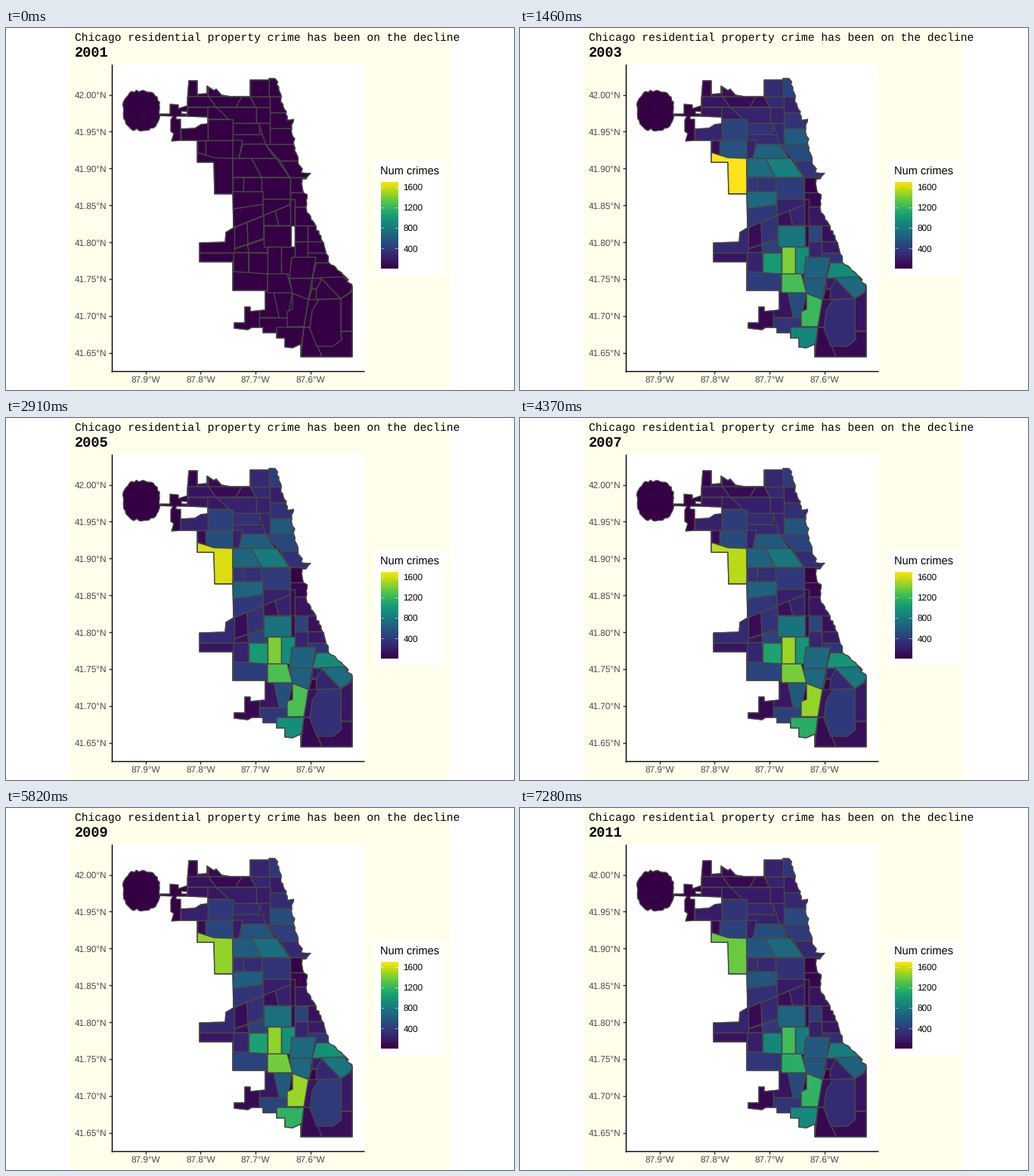
Animation of 672 by 480 pixels, one loop 8000 ms. Source, as a matplotlib script:

```python
import numpy as np
import matplotlib.pyplot as plt
from matplotlib.animation import FuncAnimation
from matplotlib.collections import PolyCollection
from matplotlib.colors import ListedColormap
from matplotlib.patches import Polygon, Rectangle

W, H = 672, 480
STEP, LOOP = 40, 8000
FIRST, YEARS = 2001, 11
TOP = 1690
CREAM, GREY, EDGE = "#ffffec", "#484848", "#474747"
SANS, MONO = "Liberation Sans", "Liberation Mono"

plt.rcParams["text.hinting"] = "none"
rng = np.random.default_rng(4)
shapes, levels = [], []


def area(points, level):
    shapes.append(np.array(points, float))
    levels.append(level)


def band(top, bottom, cuts, *values):
    """Row of areas between two streets; a pair gives a slanted street or cut."""
    (tl, tr), (bl, br) = (np.broadcast_to(y, 2) for y in (top, bottom))
    xs = [np.broadcast_to(c, 2) for c in cuts]
    tops, bottoms = np.array(xs).T
    ty = np.interp(tops, [tops[0], tops[-1]], [tl, tr])
    by = np.interp(bottoms, [bottoms[0], bottoms[-1]], [bl, br])
    for i, v in enumerate(values):
        area([(tops[i], ty[i]), (tops[i + 1], ty[i + 1]),
              (bottoms[i + 1], by[i + 1]), (bottoms[i], by[i])], v)


def rough(points, gap=3.5, size=0.9):
    """Break straight runs into small random steps."""
    out = []
    for p, q in zip(points, points[1:]):
        n = max(1, int(np.hypot(q[0] - p[0], q[1] - p[1]) / gap))
        for t in np.arange(n) / n:
            out.append(np.add(p, np.subtract(q, p) * t) + rng.normal(0.3, size, 2))
    return out + [points[-1]]


def count(level, y, year):
    """Peak in 2003, slow decline, with a later second wave in the south."""
    if year == FIRST:
        return 3
    trend = 0.8 if year == 2002 else 1 - 0.026 * (year - 2003)
    south = max(0, (y - 150) / 250) ** 2
    wave = 0.5 * np.exp(-((year - 2008.4) / 3) ** 2)
    return level * (trend + south * wave)


# City limits
coast = [(356, 67), (361, 78), (367, 105), (372, 122), (380, 120), (377, 133),
         (381, 154), (386, 176), (391, 190), (404, 194), (392, 199), (392, 218),
         (398, 220), (396, 237), (405, 256), (418, 282), (424, 298), (427, 311),
         (446, 327), (458, 343)]
inland = [(458, 436), (390, 436), (390, 419), (379, 424), (369, 423), (369, 411),
          (358, 411), (358, 404), (340, 404), (340, 397), (325, 397), (320, 400),
          (302, 398), (302, 391), (316, 391), (316, 370), (323, 370), (323, 376),
          (343, 374), (343, 348), (300, 348), (300, 310), (256, 310), (256, 285),
          (290, 284), (291, 271), (301, 265), (300, 220), (276, 220), (275, 178),
          (253, 178), (253, 149), (231, 149), (231, 134), (250, 133), (258, 128),
          (267, 127), (267, 118), (240, 117), (240, 95), (242, 70), (253, 70),
          (253, 88), (266, 87), (266, 77), (275, 83), (278, 81), (285, 89),
          (297, 91), (323, 91), (323, 69), (348, 69), (348, 67)]
limits = rough(coast) + inland

# Airport: a rounded block, a narrow link and the land beside it
turn = np.linspace(0, 2 * np.pi, 48, endpoint=False)
c, s = np.cos(turn), np.sin(turn)
reach = (np.abs(c) ** 2.5 + np.abs(s) ** 2.5) ** -0.4 + rng.normal(0, 0.03, 48)
airport = np.c_[179 + 24 * reach * c, 109.5 + 26.5 * reach * s]
link = [(202, 114), (217, 114), (217, 101), (228, 102), (228, 107), (240, 103),
        (240, 111), (232, 110), (232, 114), (240, 114), (240, 117), (225, 117),
        (225, 121), (231, 121), (231, 149), (219, 150), (222, 140), (218, 137),
        (218, 122), (221, 117), (202, 116)]

# North
band(66, 91, [240, 253, 267, 323, 348, 366], 50, 150, 90, 290, 430)
band(91, 105, [240, (268, 278), (312, 304), (323, 330), 349], 150, 90, 110, 290)
band(91, 112, [349, 375], 220)
band(112, 133, [349, 385], 340)
band(133, 154, [349, 385], 600)
band(105, 121, [230, 267, (278, 300)], 150, 180)
band(105, 126, [(278, 300), 331, 349], 240, 230)
band(121, 149, [231, 267, 300], 250, 440)
band(126, 141, [300, 335], 330)
band(141, 154, [300, 343], 290)
band(126, 154, [(334, 343), 349], 270)
band(149, 173, [253, 264, 300, (313, 308)], 90, 530, 230)
band(154, 173, [(313, 308), (343, 356)], 640)
band(154, 176, [(343, 362), 390], 480)
area([(253, 165), (275, 172), (300, 173), (300, 220), (250, 220)], TOP)

# West side and centre
band(173, 198, [300, (325, 338), (358, 375)], 700, 850)
band(176, 198, [(362, 375), 406], 330)
band(198, 217, [300, 314, 338], 350, 330)
band(198, 227, [338, 376], 400)
band(198, 218, [376, 400], 20)
band(218, 237, [376, 402], 60)
band(217, (240, 234), [300, 340], 680)
band((240, 234), (265, 249), [300, 340], 370)
band(227, (249, 234), [340, 376], 230)
band((249, 234), 262, [340, (356, 361), 377], 120, 240)
band(227, 262, [376, 382], 70)
band(237, 262, [382, 410], 160)

# Midway down
band((265, 249), (293, 279), [301, (319, 320), 341], 90, 330)
band((293, 279), 298, [302, (320, 321), 346], 130, 420)
band(262, 290, [341, 377], 760)
band(262, 290, [377, 382], 70)
late_area = len(shapes) - 1
band(262, 283, [382, 399, 425], 450, 120)
band(283, 298, [399, 430], 180)
band(298, 311, [392, 432], 330)
band(283, 304, [382, 399], 240)
band(265, 298, [250, 302], 280)
band(298, 310, [250, 301], 150)
band(298, (323, 326), [301, 321], 230)
band(298, 326, [321, 346], 1000)
band(290, 326, [346, 364, 382], 1390, 920)

# South
band((323, 326), 348, [300, 346], 390)
band(348, 384, [334, (354, 362)], 140)
band(350, 387, [(354, 362), (379, 372)], 480)
band(326, 351, [346, (372, 379)], 1230)
band(304, 332, [(378, 375), (410, 405)], 640)
band(311, 331, [(410, 405), 450], 900)
band(332, (352, 360), [(375, 379), (405, 400)], 600)
area([(416, 331), (443, 359), (400, 360), (404, 346)], 230)
band(332, 346, [405, (418, 411)], 180)
band(346, 360, [(404, 400), 410], 30)
area([(416, 331), (446, 330), (460, 341), (455, 350), (443, 359)], 680)
band(365, 404, [300, 335], 60)
band(384, 404, [335, 372], 330)
band(397, 425, [358, (394, 390)], 850)
band(360, 397, [(400, 394), (414, 402)], 120)
band((359, 348), 402, [443, 460], 150)
band(402, 436, [(402, 418), 460], 80)
band(397, 436, [(394, 390), (402, 418)], 60)
area([(379, 352), (400, 360), (394, 396), (372, 396), (372, 376), (379, 373)], 1190)
area([(414, 360), (443, 359), (443, 402), (444, 413), (433, 422), (411, 422),
      (402, 398), (405, 375)], 290)

table = np.ma.array([[count(v, p[:, 1].mean(), FIRST + i) for i in range(YEARS)]
                     for p, v in zip(shapes, levels)])
table[late_area, 0] = np.ma.masked  # no data in the first year

# Viridis, slightly darkened
rgb = plt.get_cmap("viridis")(np.linspace(0, 1, 256))[:, :3]
cmap = ListedColormap(rgb ** 1.2)
cmap.set_bad("white")

fig = plt.figure(figsize=(W / 96, H / 96), dpi=96, facecolor="white")
ax = fig.add_axes([0, 0, 1, 1])
ax.axis("off")


def box(x0, y0, x1, y1, color):
    ax.add_patch(Rectangle((x0, y0), x1 - x0, y1 - y0, fc=color, lw=0))


def line(x0, y0, x1, y1, color, px=1.42):
    ax.plot([x0, x1], [y0, y1], color=color, lw=px * 0.75, solid_capstyle="butt")


def label(x, y, text, size, font=SANS, **kw):
    return ax.text(x, y, text, fontsize=size, family=font, va="baseline", **kw)


def land(points, fill, z):
    return ax.add_patch(Polygon(points, fc=fill, ec=EDGE, lw=1.05, zorder=z,
                                joinstyle="round"))


box(84, 0, 587, H, CREAM)
box(140, 48, 474, 455, "white")
box(488, 176, 582, 328, "white")

land(limits, cmap(0), 1.1)
city = PolyCollection(shapes, cmap=cmap, edgecolors=EDGE, linewidths=1.05,
                      joinstyle="round", zorder=1.2)
city.set_clim(0, TOP)
ax.add_collection(city)
city.set_clip_path(land(limits, "none", 1.3))
land(link, cmap(0), 1.4)
land(airport, cmap(0), 1.4)

# Axes
for i in range(8):
    y = 88.5 + 48.93 * i
    line(136.4, y, 140, y, "#333333")
    label(133.5, y + 4.2, f"{42 - 0.05 * i:.2f}°N", 8.8, color=GREY, ha="right")
for i in range(4):
    x = 184.5 + 72.85 * i
    line(x, 455, x, 458.7, "#333333")
    label(x, 470, f"{87.9 - 0.1 * i:.1f}°W", 8.8, color=GREY, ha="center")
line(140, 48, 140, 455.7, "black")
line(139.3, 455, 474, 455, "black")

# Legend
label(495.2, 195.3, "Num crimes", 11)
ax.imshow(np.linspace(1, 0, 256)[:, None], cmap=cmap, aspect="auto", zorder=1.5,
          extent=(495.5, 518.5, 319.5, 204.5), interpolation="bilinear")
for n in (400, 800, 1200, 1600):
    y = 319.5 - n * 0.0681
    line(495.5, y, 500.1, y, "white", 0.5)
    line(513.9, y, 518.5, y, "white", 0.5)
    label(525.6, y + 4.2, str(n), 8.8)

# Headings
label(91, 16.5, "Chicago residential property crime has been on the decline", 11, MONO)
title = label(91, 38, str(FIRST), 14, MONO, weight="bold")

ax.set_xlim(0, W)
ax.set_ylim(H, 0)


def draw(k):
    i = (STEP * k + 30) * YEARS // LOOP
    title.set_text(str(FIRST + i))
    city.set_array(table[:, i])
    return city, title


anim = FuncAnimation(fig, draw, frames=LOOP // STEP, interval=STEP,
                     init_func=lambda: draw(0), repeat=True, repeat_delay=0)
plt.show()
```
